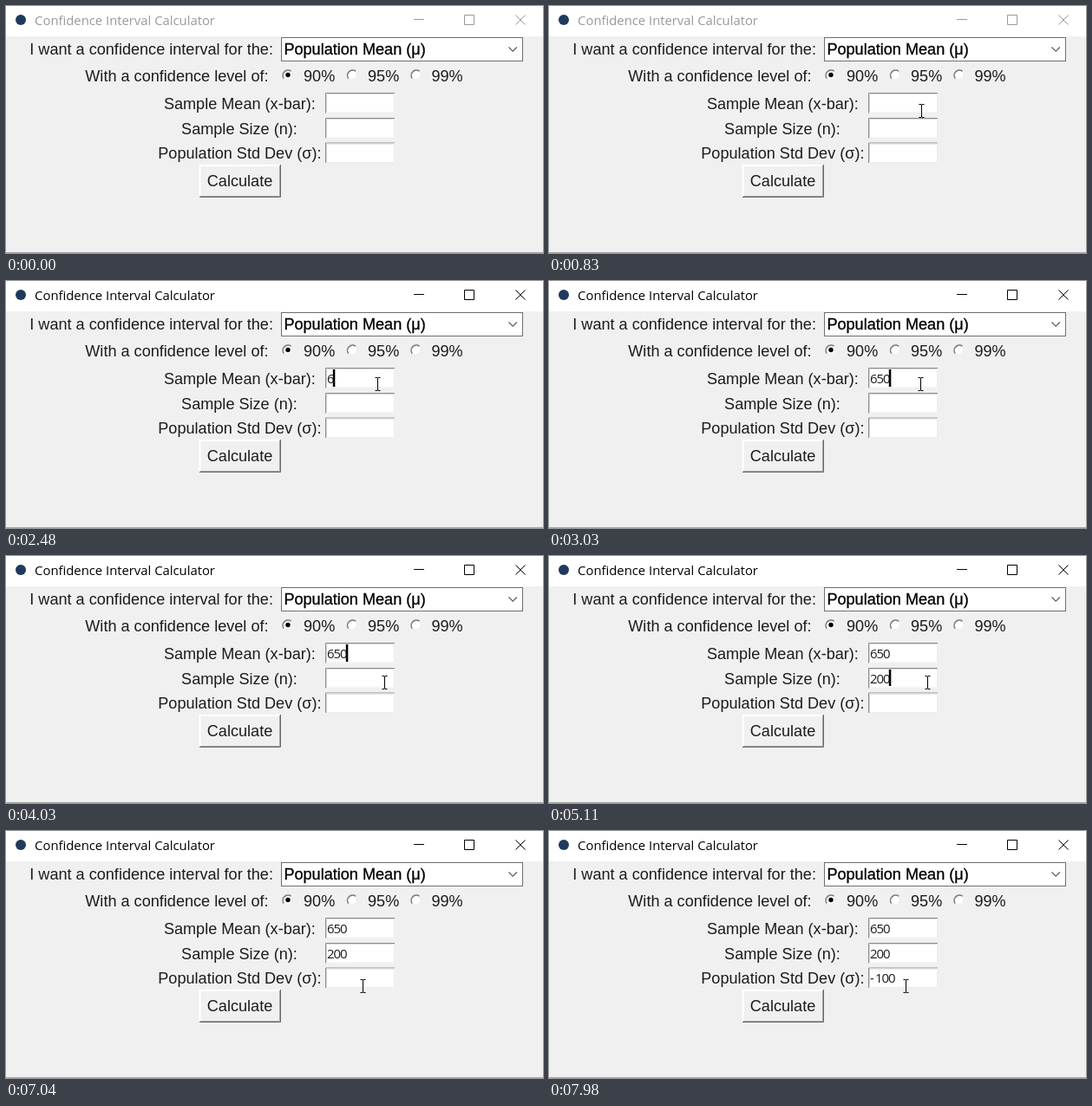
These frames come from a looping animation (619x285 px, 8 s). An HTML page:

```html
<!DOCTYPE html>
<html lang="en">
<head>
<meta charset="utf-8">
<title>Confidence Interval Calculator</title>
<style>
  html, body { margin: 0; width: 100%; height: 100%; overflow: hidden; background: #f0f0f0; }
  svg { display: block; width: 619px; height: 285px; }
  text { font: 18.1px "Liberation Sans", Arial, sans-serif; fill: #1c1c1c; white-space: pre; }
  .title { font: 14.84px "Open Sans", "Noto Sans", sans-serif; }
  .value { font: 15px "Open Sans", "Noto Sans", sans-serif; letter-spacing: -1.08px; }
  .choice { fill: #000; stroke: #000; stroke-width: .3px; }
  .line { fill: none; }

  /* The window gains focus on the first click. */
  #bar { animation: focus 8s step-end infinite; }
  #bar text { fill: currentColor; }
  #bar path { stroke: currentColor; }
  @keyframes focus { 0% { color: #999; } 14.375%, 100% { color: #000; } }
</style>
</head>
<body>
<svg viewBox="0 0 619 285">
  <defs>
    <g id="entry">
      <path d="M0 0h80v23.5h-80z" fill="#fff"/>
      <path d="M.5 23.5V.5H80" class="line" stroke="#8c8c8c"/>
      <path d="M1.5 23V1.5H79" class="line" stroke="#d8d8d8"/>
      <path d="M79.5 1V23H1" class="line" stroke="#ececec"/>
    </g>
    <g id="radio">
      <circle r="6" fill="#fff"/>
      <path d="M-4.2 4.2A6 6 0 0 1 4.2 -4.2" class="line" stroke="#7c7c7c" stroke-width="1.6"/>
      <path d="M4.2 -4.2A6 6 0 0 1 -4.2 4.2" class="line" stroke="#e6e6e6"/>
    </g>
  </defs>

  <rect width="619" height="285" fill="#f0f0f0"/>
  <rect width="619" height="35" fill="#fff"/>
  <rect y="284" width="619" height="1" fill="#a6a6a6"/>
  <circle cx="17" cy="16" r="6" fill="#1f3a5c"/>
  <g id="bar">
    <text class="title" x="33.1" y="22">Confidence Interval Calculator</text>
    <path class="line" d="M470 15.5h12M528.5 10.5h11v11h-11zM587.5 10.5l11 11m0-11l-11 11"/>
  </g>

  <text x="27.3" y="56">I want a confidence interval for the:</text>
  <rect x="317.5" y="36.5" width="278" height="27" fill="#fff" stroke="#707070"/>
  <path class="line" d="M579.5 47.5l4.7 4.7 4.7-4.7" stroke="#606060" stroke-width="1.3"/>
  <text class="choice" x="320.4" y="56">Population Mean (μ)</text>

  <text x="91.3" y="87">With a confidence level of:</text>
  <use href="#radio" x="324.5" y="79.5"/>
  <use href="#radio" x="399" y="79.5"/>
  <use href="#radio" x="472.5" y="79.5"/>
  <circle cx="325" cy="79.5" r="2.7"/>
  <text x="343" y="87">90%</text>
  <text x="417" y="87">95%</text>
  <text x="490.4" y="87">99%</text>

  <text x="181.9" y="118.5">Sample Mean (x-bar):</text>
  <text x="202.1" y="147.5">Sample Size (n):</text>
  <text x="175.3" y="176">Population Std Dev (σ):</text>
  <use href="#entry" x="368" y="100"/>
  <use href="#entry" x="368" y="129"/>
  <use href="#entry" x="368" y="157.5"/>
  <text class="value" x="370" y="117.5"></text>
  <text class="value" x="370" y="146.5"></text>
  <text class="value" x="370" y="175"><tspan></tspan><tspan dx="2.2"></tspan></text>
  <rect id="caret" width="2.5"/>

  <path class="line" d="M223.5 219V184H315" stroke="#fff" stroke-width="2"/>
  <path class="line" d="M223 220.5H316.5V183" stroke="#696969"/>
  <path class="line" d="M224 219.5H315.5V184" stroke="#a0a0a0"/>
  <text x="231.8" y="208.2">Calculate</text>

  <circle id="click" r="15" fill="#ff0" fill-opacity=".47"/>
  <g id="pointer">
    <path id="arrow" d="M0 0V16.5L3.8 13 6.4 19 8.8 18 6.2 12.1H11.5Z" fill="#fff" stroke="#000"/>
    <path id="beam" class="line" d="M-3-7.5h2.5l.5.5.5-.5H3M0-7V7M-3 7.5h2.5l.5-.5.5.5H3" stroke="#000"/>
  </g>
</svg>
<script>
  const LOOP = 8000, ADVANCE = 7.5, HYPHEN = 6;
  const $ = id => document.getElementById(id);
  const values = [...document.querySelectorAll('.value')];
  const [sign, digits] = values[2].children;

  const fields = [
    { focus: 1150, text: '650', keys: [2480, 2710, 2860], top: 102, height: 20 },
    { focus: 4260, text: '200', keys: [4810, 5040, 5110], top: 131, height: 19 },
    { focus: 6430, text: '-100', keys: [7120, 7270, 7350, 7520], top: 159, height: 20 }
  ];
  // The caret turns on and off at alternate times.
  const blinks = [1150, 1780, 2080, 2710, 3030, 3640, 3950, 5740, 6040, 7040, 7120, 7980];
  const clicks = [[1080, 1320], [4180, 4260], [6350, 6430]];
  const moves = [
    { start: 220, end: 910, steps: 10, from: [515, 312], to: [428, 119] },
    { start: 3640, end: 4030, steps: 6, from: [428, 119], to: [436, 146] },
    { start: 5890, end: 6120, steps: 4, from: [436, 146], to: [411, 179] }
  ];

  const passed = (times, t) => times.filter(time => time <= t).length;
  const show = (el, on) => el.setAttribute('visibility', on ? 'visible' : 'hidden');
  const place = (el, x, y) => el.setAttribute('transform', `translate(${x} ${y})`);

  function pointerAt(t) {
    const move = moves.filter(m => m.start <= t).pop();
    if (!move) return null;
    const { start, end, steps, from, to } = move;
    const step = Math.floor((t - start) / (end - start) * (steps - 1) + 0.07);
    const p = Math.min(1, (step + 1) / steps);
    const eased = 1 - (1 - p) ** 2;
    return from.map((v, i) => Math.round(v + (to[i] - v) * eased));
  }

  function drawFields(t) {
    const typed = fields.map(f => f.text.slice(0, passed(f.keys, t)));
    values[0].textContent = typed[0];
    values[1].textContent = typed[1];
    sign.textContent = typed[2].slice(0, 1);
    digits.textContent = typed[2].slice(1);

    const row = Math.max(0, passed(fields.map(f => f.focus), t) - 1);
    const width = [...typed[row]].reduce((w, c) => w + (c === '-' ? HYPHEN : ADVANCE), 0);
    const caret = $('caret');
    caret.setAttribute('height', fields[row].height);
    place(caret, 369.3 + width, fields[row].top);
    show(caret, passed(blinks, t) % 2);
  }

  function drawPointer(t) {
    const at = pointerAt(t);
    const overEntry = at && at[0] < 447 && (at[1] < 123 || t > 1000);
    show($('arrow'), at && !overEntry);
    show($('beam'), overEntry);
    show($('click'), clicks.some(([down, up]) => t >= down && t < up));
    if (!at) return;
    const [x, y] = at;
    place($('pointer'), x + (overEntry ? 0.5 : 0), y);
    place($('click'), x - 2, y - 1);
  }

  function draw() {
    const t = performance.now() % LOOP;
    drawFields(t);
    drawPointer(t);
    requestAnimationFrame(draw);
  }
  draw();
</script>
</body>
</html>
```
